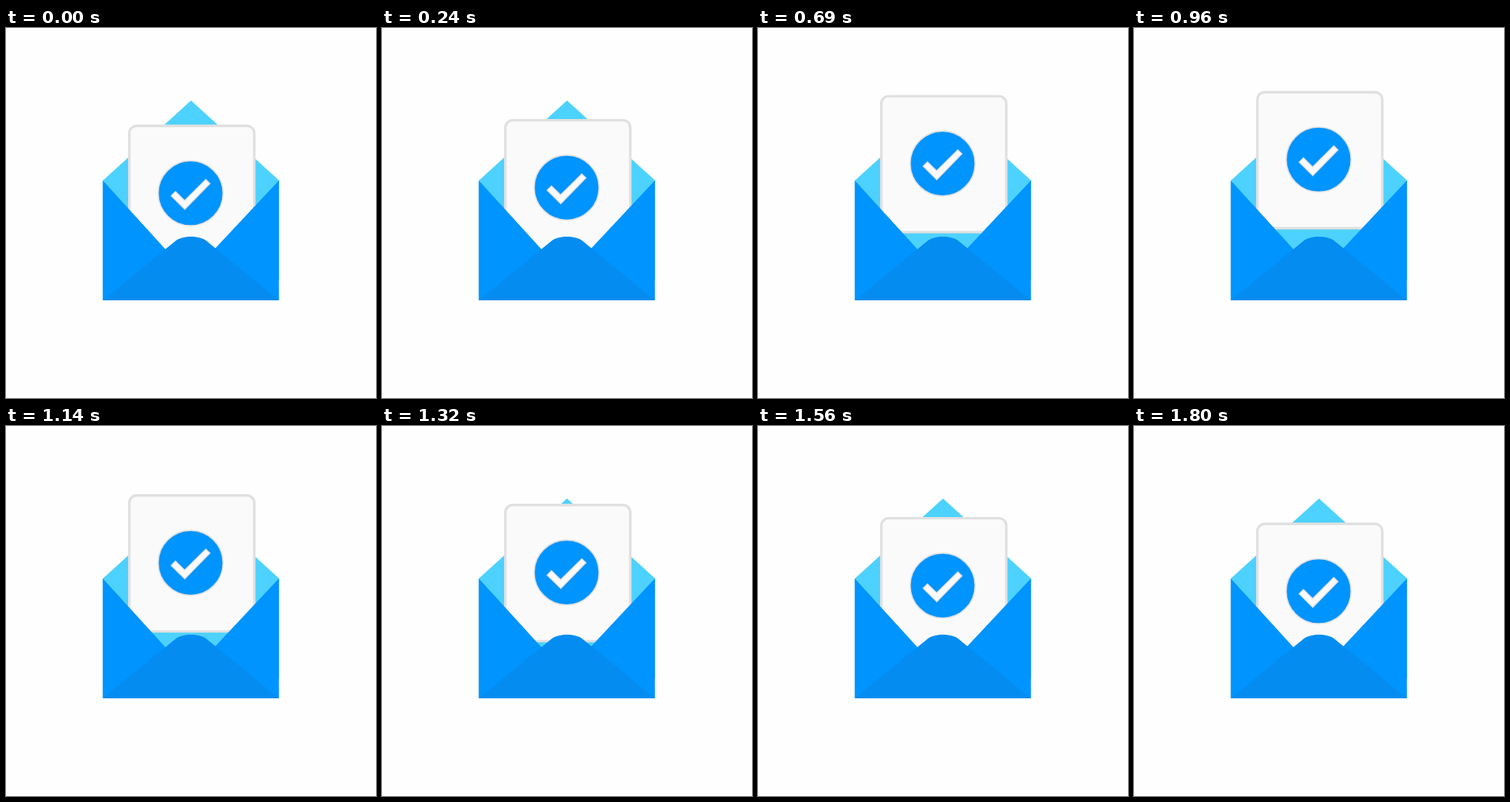
These frames come from a looping animation (500 by 500 pixels, 1830 ms). An HTML page:

```html
<!DOCTYPE html>
<html lang="en">
<head>
<meta charset="utf-8">
<title>Letter rising from an envelope</title>
<style>
  html, body { margin: 0; width: 100%; height: 100%; overflow: hidden; background: #fefefe; }
  svg { display: block; width: 100%; height: 100%; }
</style>
</head>
<body>
<svg viewBox="0 0 500 500">
  <path fill="#4dd2ff" d="M250 98 L369 206 V340 H131 V206 Z"/>
  <g id="letter" stroke="#e0e0e0">
    <rect x="166.7" y="132.2" width="168.8" height="183.8" rx="10" fill="#fafafa" stroke-width="3.4"/>
    <circle cx="249.5" cy="223.3" r="43.8" fill="#0094ff" stroke-width="1.6"/>
    <path fill="#fafafa" stroke-width="1.4" d="M223.2 226.8 L229 221 L241.4 233.2 L270 204.8 L275.6 210.2 L241.6 245 Z"/>
  </g>
  <path fill="#0094ff" d="M130.7 206 L215 298.5 L250 330 L283 297.5 L368.8 206 V368 H130.7 Z"/>
  <path fill="#048cf0" d="M130.7 368 L230 287 C240 280.3 260 280.3 270 287 L368.8 368 Z"/>
</svg>
<script>
  const LOOP = 1830, STEP = 30, PERIOD = 1800, RISE = 46;
  const letter = document.getElementById('letter');

  function draw(now) {
    const t = Math.floor((now % LOOP) / STEP) * STEP;
    const lift = RISE * (1 - Math.cos(2 * Math.PI * t / PERIOD)) / 2;
    letter.setAttribute('transform', `translate(0 ${-lift.toFixed(2)})`);
  }

  let start;
  function tick(now) {
    start ??= now;
    draw(now - start);
    requestAnimationFrame(tick);
  }

  draw(0);
  requestAnimationFrame(tick);
</script>
</body>
</html>
```
